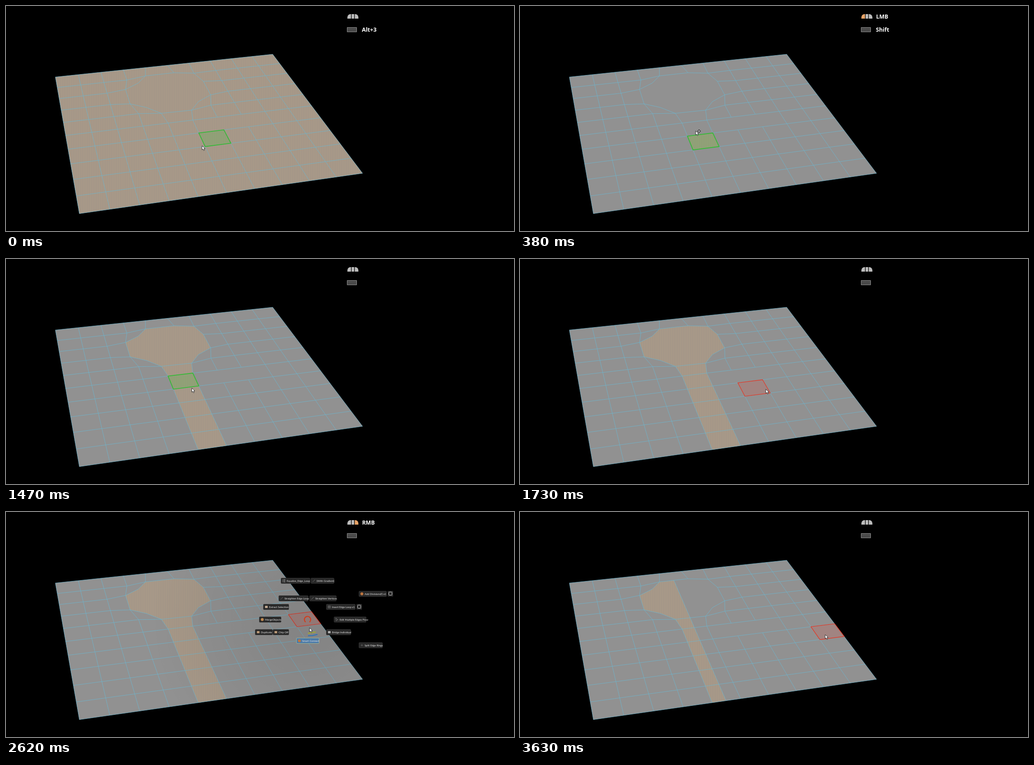
Animation of 1122x499 px, one loop 3850 ms. Source, as an HTML page with a canvas:

```html
<!DOCTYPE html>
<html lang="en">
<head>
<meta charset="utf-8">
<title>Mesh selection and connect</title>
<style>
  html, body { margin: 0; width: 100%; height: 100%; overflow: hidden; background: #000; }
  canvas { display: block; }
</style>
</head>
<body>
<canvas id="stage" width="1122" height="499"></canvas>
<script>
const ctx = document.getElementById('stage').getContext('2d');
const LOOP = 3850;
const LINE = '#6db5cf';
const ORANGE = '#e9a468';

// Perspective plane: unit square projected onto four corners.
const project = ((tl, tr, br, bl) => {
  const d1 = [tr[0] - br[0], tr[1] - br[1]], d2 = [bl[0] - br[0], bl[1] - br[1]];
  const s = [0, 1].map(k => tl[k] - tr[k] + br[k] - bl[k]);
  const den = d1[0] * d2[1] - d2[0] * d1[1];
  const g = (s[0] * d2[1] - d2[0] * s[1]) / den;
  const h = (d1[0] * s[1] - s[0] * d1[1]) / den;
  return (u, v) => [0, 1].map(k =>
    ((tr[k] - tl[k] + g * tr[k]) * u + (bl[k] - tl[k] + h * bl[k]) * v + tl[k]) / (1 + g * u + h * v));
})([109, 157.5], [589, 107], [787.5, 371], [162, 460.5]);

// Vertices pulled onto the rounded face.
const moved = {
  '4,1': [308, 155], '5,1': [371, 148], '6,1': [415, 149], '6,2': [436, 167], '6,3': [452, 197],
  '5,4': [410, 231], '4,4': [343, 238], '3,3': [274, 217], '3,2': [264, 185]
};
const vertex = (i, j) => moved[[i, j]] || project(i / 10, j / 10);
const cell = (i, j) => [vertex(i, j), vertex(i + 1, j), vertex(i + 1, j + 1), vertex(i, j + 1)];
const column = (i, from, to) => Array.from({ length: to - from + 1 }, (_, k) => vertex(i, from + k));

const plane = [[0, 0], [10, 0], [10, 10], [0, 10]].map(p => vertex(...p));
const leftRim = [[343, 238], [310, 225], [274, 217], [264, 185], [292, 171], [308, 155]];
const rightRim = [[371, 148], [415, 149], [436, 167], [452, 197], [425, 212], [410, 231]];
const leftSide = column(4, 5, 10).reverse();
const cutLine = [[340, 151.5], [455, 418]];
const selections = [
  plane,
  cell(4, 6),
  [...leftSide, ...leftRim, ...rightRim, ...column(5, 5, 10)],
  [...leftSide, ...leftRim, ...cutLine]
];

const edges = [leftRim.slice(0, 3), leftRim.slice(3), rightRim.slice(3)];
const inHole = (i, j) => (i === 4 || i === 5) && (j === 2 || j === 3);
const isGap = (i, j) => (i === 6 || i === 7) && j === 5;
for (let i = 0; i <= 10; i++) for (let j = 0; j <= 10; j++) {
  if (inHole(i, j)) continue;
  if (i < 10 && !inHole(i + 1, j)) edges.push([vertex(i, j), vertex(i + 1, j)]);
  if (j < 10 && !inHole(i, j + 1) && !isGap(i, j)) edges.push([vertex(i, j), vertex(i, j + 1)]);
}

const stripes = (() => {
  const tile = document.createElement('canvas');
  tile.width = 4; tile.height = 4;
  const c = tile.getContext('2d');
  c.fillStyle = '#a89988'; c.fillRect(0, 0, 4, 4);
  c.fillStyle = '#a09487'; c.fillRect(0, 0, 1, 4);
  return ctx.createPattern(tile, 'repeat');
})();

// Timeline: each row is a start time and its values.
const cursorPath = [
  [0, 433, 310], [60, 433, 310], [340, 388, 277], [1250, 388, 277], [1470, 410, 286], [1620, 470, 318],
  [1920, 667, 239], [2300, 667, 239], [2600, 670, 256], [2740, 672, 262], [3090, 688, 247],
  [3150, 659, 267], [3520, 659, 267], [3630, 674, 272], [LOOP, 674, 272]
];
const hoverSteps = [
  [0, 5, 6], [230, 4, 6], [420, 4, 5], [1500, 4, 6], [1570, 5, 6], [1700, 6, 6],
  [1800, 7, 6], [1840, 8, 5], [1890, 9, 5], [2750, 9, 6]
];
const selectionSteps = [[0, 0], [210, 1], [590, 2], [2780, 3]];
const during = (t, a, b) => t >= a && t < b;
const stepAt = (steps, t) => steps.filter(s => s[0] <= t).pop().slice(1);

function cursorAt(t) {
  const n = cursorPath.findIndex(p => p[0] > t);
  const a = cursorPath[n - 1], b = cursorPath[n], k = (t - a[0]) / (b[0] - a[0]);
  return [a[1] + (b[1] - a[1]) * k, a[2] + (b[2] - a[2]) * k];
}

// Drawing helpers
function trace(points, closed) {
  ctx.beginPath();
  points.forEach(p => ctx.lineTo(...p));
  if (closed) ctx.closePath();
}
function paint(fill, stroke, width = 1) {
  if (fill) { ctx.fillStyle = fill; ctx.fill(); }
  if (stroke) { ctx.strokeStyle = stroke; ctx.lineWidth = width; ctx.stroke(); }
}
function line(points, color, width = 1) { trace(points); paint(null, color, width); }
function polygon(points, fill, stroke, width) { trace(points, true); paint(fill, stroke, width); }
function circle(x, y, r, fill, stroke, width) {
  ctx.beginPath(); ctx.arc(x, y, r, 0, 7); paint(fill, stroke, width);
}
function box(x, y, w, h, r, fill, stroke, width) {
  ctx.beginPath(); ctx.roundRect(x, y, w, h, r); paint(fill, stroke, width);
}
function label(text, x, y, size, color = '#e4e4e4', align = 'left', weight = '') {
  ctx.font = `${weight} ${size}px ${weight ? '"Open Sans"' : 'Lato'}, sans-serif`;
  ctx.textAlign = align;
  ctx.fillStyle = color;
  ctx.fillText(text, x, y);
}

const icons = {
  disc: (x, y, c) => circle(x, y, 3.8, c),
  ring: (x, y, c) => { circle(x, y, 3.2, null, c); circle(x, y, 1.2, c); },
  square: (x, y, c) => box(x - 3.5, y - 3, 7, 6, 1, c),
  plus: (x, y, c) => { line([[x - 3, y], [x + 3, y]], c); line([[x, y - 3], [x, y + 3]], c); },
  cross: (x, y, c) => { line([[x - 3, y - 3], [x + 3, y + 3]], c); line([[x - 3, y + 3], [x + 3, y - 3]], c); },
  rows: (x, y, c) => [-3, 0, 3].forEach(d => line([[x - 3.5, y + d], [x + 3.5, y + d]], c)),
  tree: (x, y, c) => {
    line([[x - 3, y - 4], [x - 3, y + 4]], c);
    [-3, 0, 3].forEach(d => line([[x - 1, y + d], [x + 3.5, y + d]], c, 1.4));
  },
  grid: (x, y, c) => { box(x - 3, y - 3, 6, 6, 0, null, c, .9); icons.plus(x, y, c); },
  slash: (x, y, c) => line([[x - 3, y + 3], [x + 3, y - 3]], c),
  arrow: (x, y, c) => polygon([[x - 3, y - 4], [x + 3, y + 1], [x, y + 1], [x - 2, y + 4]], null, c, .8)
};

// Each panel: box, title, then icons as [kind, dx, dy, colour].
const GREY = '#c4c4c4', TEAL = '#4aa6bd', RUST = '#dc8444';
const panels = [
  [652, 122, 32, 22, 'AutoSave', [['ring', 9, 13, GREY]]],
  [633, 153, 70, 15, '', [['disc', 22, 7, '#dca048'], ['square', 35, 8, '#5b938f'], ['arrow', 49, 8, '#999'], ['slash', 62, 8, GREY]]],
  [583, 169, 19, 23, 'Cam', [['square', 9, 14, '#bbb']]],
  [718, 169, 19, 23, 'Files', [['square', 9, 14, GREY]]],
  [569, 221, 18, 39, 'Outl', [['tree', 9, 15, GREY]]],
  [750, 213, 35, 55, 'Objects', [['disc', 9, 14, RUST], ['ring', 25, 14, '#aaa'], ['plus', 9, 30, GREY],
    ['grid', 25, 30, '#477f9a'], ['square', 9, 46, '#45a3c5'], ['rows', 25, 46, '#aaa']]],
  [800, 214, 34, 23, 'Geo', [['ring', 9, 14, '#aaa'], ['slash', 25, 14, RUST]]],
  [576, 281, 34, 38, 'HSD', [['square', 9, 13, '#888'], ['rows', 25, 14, GREY], ['disc', 9, 28, '#aaa'], ['disc', 25, 28, '#888']]],
  [726, 281, 34, 39, 'UV', [['grid', 9, 14, '#398c96'], ['square', 25, 12, '#999'], ['cross', 11, 26, '#777'], ['grid', 25, 28, '#aaa']]],
  [798, 295, 19, 40, 'VMA', [['cross', 9.5, 15, GREY], ['cross', 9.5, 31, GREY]]]
];
const panelTexts = [['15%', 675, 138, 6], ['T', 578, 255, 12], ['Del', 585, 302, 5], ['New', 585, 318, 5],
  ['Default', 601, 318, 5], ['Proj', 751, 302, 5], ['Del', 735, 318, 5], ['Transf', 751, 318, 5]];
const dialIcons = [
  ['grid', 668, 183, GREY], ['ring', 720, 218, '#aaa'], ['rows', 726, 240, GREY], ['square', 720, 263, RUST],
  ['grid', 708, 281, GREY], ['grid', 668, 298, '#67b5bc'], ['disc', 645, 294, '#40a5bd'], ['rows', 627, 281, GREY],
  ['slash', 613, 262, '#83b9d1'], ['tree', 611, 240, GREY]
];

function drawHotbox() {
  circle(668, 240, 69, 'rgba(25,25,25,.25)');
  circle(668, 240, 51.5, 'rgba(65,65,65,.46)', '#a4a4a4', 1.2);
  circle(668, 240, 57, null, 'rgba(66,66,66,.85)', 10);
  circle(668, 240, 62.5, null, '#919191', 1.2);
  polygon(cell(9, 5), 'rgba(255,50,30,.06)', '#c92e20', 1.2);
  dialIcons.forEach(([kind, x, y, c]) => icons[kind](x, y, c));
  label('Ne', 690, 297, 9, '#ddd', 'center');
  label('1', 620, 197, 8, '#ddd', 'center');
  line([[634, 295], [646, 300]], '#ccc', 1.4);
  line([[645, 279], [651, 283]], '#ccc', 1.4);
  for (const [x, y, w, h, title, parts] of panels) {
    box(x + .5, y + .5, w - 1, h - 1, 2.5, 'rgba(66,66,66,.93)', '#687052');
    label(title, x + w / 2, y + 6, 5.8, '#e05ce0', 'center');
    parts.forEach(([kind, dx, dy, c]) => icons[kind](x + dx, y + dy, c));
  }
  panelTexts.forEach(([s, x, y, size]) => label(s, x, y, size, s === 'T' || s === '15%' ? '#60b5cc' : '#ddd', 'center'));
}

// Each entry: text, x, y, width, icon, icon colour.
const menu = [
  ['Equalize_Edge_Loop', 607, 146, 65, 'tree', '#999'], ['(With Gradient)', 673, 146, 52, 'slash', '#777'],
  ['Straighten Edge Loop', 602, 185, 66, 'slash', '#777'], ['Straighten Vertices', 670, 185, 60, 'slash', '#888'],
  ['Extract Selection', 568, 204, 57, 'square', '#bda690'], ['Insert Edge Loop x1', 707, 204, 65, 'grid', '#777'],
  ['Add Divisions(f) x1', 779, 175, 62, 'disc', '#bd743e'], ['MergeObjects', 559, 232, 49, 'disc', '#bd8850'],
  ['Edit Multiple Edges Flow', 724, 232, 72, 'arrow', '#888'], ['Duplicate', 550, 260, 39, 'square', '#b69675'],
  ['Chip Off', 589, 260, 36, 'square', '#b69675'], ['Bridge Individual', 707, 260, 55, 'square', '#aaa'],
  ['Split Edge Rings', 779, 289, 53, 'plus', '#666'], ['Smart Connect', 641, 279, 51, 'disc', '#bd743e']
];

function drawMarkingMenu() {
  const shade = ctx.createRadialGradient(667, 240, 40, 667, 240, 350);
  shade.addColorStop(0, 'rgba(0,0,0,.09)');
  shade.addColorStop(1, 'rgba(0,0,0,0)');
  circle(667, 240, 350, shade);
  for (const [text, x, y, w, kind, color] of menu) {
    const active = text === 'Smart Connect';
    box(x + .5, y + .5, w - 1, 12, 1.5, active ? '#4d7ba8' : '#292929', active ? '#a9bd92' : '#343434', .8);
    ctx.save();
    ctx.translate(x + 7, y + 6.5);
    ctx.scale(.85, .85);
    icons[kind](0, 0, color);
    ctx.restore();
    label(text, x + 13, y + 8.8, 5.8);
  }
  [[774, 204], [843, 175]].forEach(([x, y]) => {
    box(x, y, 12, 12.5, 1, '#292929');
    box(x + 2.5, y + 2.5, 7, 7, 1, null, '#c4c4c4');
  });
  ctx.beginPath();
  ctx.arc(666, 238.5, 7, 2.2, 7.2);
  paint(null, '#d33c1c', 2.2);
  line([[667, 269], [684, 266]], '#a5ad25', 2);
  line([[667, 274.5], [677, 274], [688, 271.5]], '#2873bd', 2.2);
}

function drawInput(t) {
  const lmb = during(t, 150, 250) || during(t, 320, 900), rmb = during(t, 2160, 2740);
  box(754, 18, 8, 10, [7, 0, 0, 0], lmb ? ORANGE : '#bcbcbc');
  box(763.3, 18, 5.7, 10, 0, '#bcbcbc');
  box(770.3, 18, 8, 10, [0, 7, 0, 0], rmb ? ORANGE : '#bcbcbc');
  box(753.5, 47.5, 21, 10, 0, '#555', '#848484');
  for (let row = 0; row < 3; row++) for (let k = 0; k < 6; k++) {
    box(755 + k * 3.1, 49.2 + row * 2.7, 1.8, 1.4, 0, '#303030');
  }
  const button = lmb ? 'LMB' : rmb ? 'RMB' : '';
  const key = t < 100 ? 'Alt+3' : during(t, 270, 1350) ? 'Shift' : '';
  label(button, 786.5, 28, 12.3, '#fff', 'left', 'bold');
  label(key, 786, 56.8, 12.6, '#fff', 'left', 'bold');
}

function drawCursor(t) {
  const [x, y] = cursorAt(t);
  if (during(t, 590, 780)) circle(389, 279, 4, null, '#e04424', 1.4);
  if (during(t, 1950, 2160)) circle(666, 239, 4, null, '#3030c0', 1.5);
  const arrow = [[0, 0], [0, 9], [2.1, 7.2], [3.8, 10.6], [5.4, 9.8], [3.9, 6.5], [6.7, 6.3]];
  polygon(arrow.map(p => [x + p[0], y + p[1]]), '#fff', '#222', .9);
  if (during(t, 270, 1350)) {
    box(x + 6.2, y - 3, 2.6, 7, 0, '#222');
    box(x + 4, y - .8, 7, 2.6, 0, '#222');
    box(x + 7, y - 2, 1, 5, 0, '#ddd');
    box(x + 5, y, 5, 1, 0, '#ddd');
  }
}

function draw(t) {
  ctx.fillStyle = '#000';
  ctx.fillRect(0, 0, 1122, 499);
  const [selected] = stepAt(selectionSteps, t);
  const hover = stepAt(hoverSteps, t);

  polygon(plane, '#919191');
  polygon(selections[selected], stripes);
  edges.forEach(e => line(e, LINE, .8));
  if (selected === 3) line(cutLine, LINE, .8);

  const onSelection = selected === 0 || hover[0] === 4;
  if (onSelection) polygon(cell(...hover), 'rgba(75,185,65,.24)', '#38b838', 1.8);
  else polygon(cell(...hover), 'rgba(255,60,40,.15)', '#e23a28', 1.3);

  if (during(t, 1950, 2160)) drawHotbox();
  if (during(t, 2160, 2740)) drawMarkingMenu();
  drawInput(t);
  drawCursor(t);
}

const start = performance.now();
function frame() {
  draw((performance.now() - start) % LOOP);
  requestAnimationFrame(frame);
}
frame();
</script>
</body>
</html>
```
